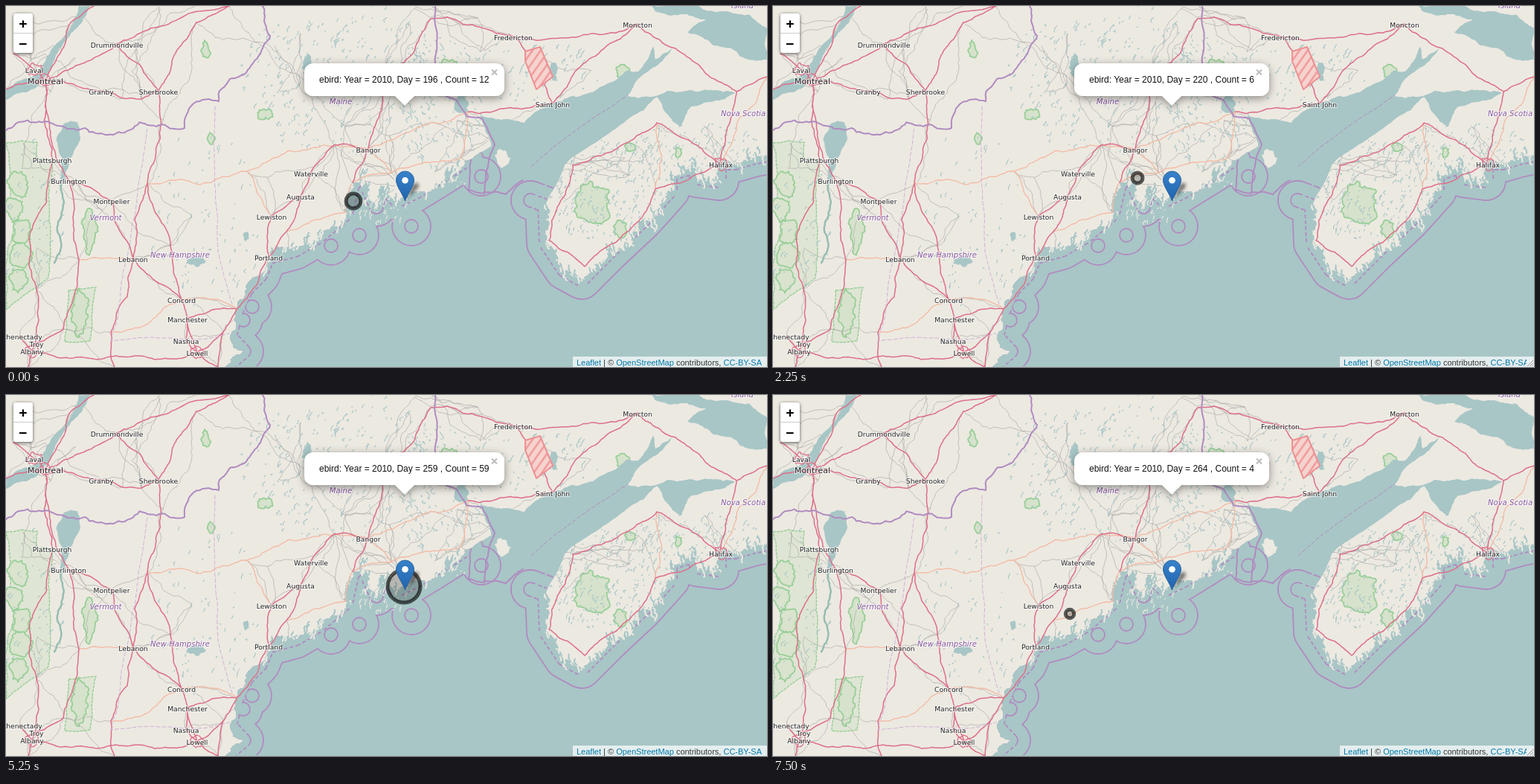
Write an HTML page that moves like this. It is 1023x485 px and loops after 8 s.

```html
<!DOCTYPE html>
<html lang="en">
<head>
<meta charset="utf-8">
<title>Sightings map</title>
<style>
  html, body { margin: 0; width: 100%; height: 100%; overflow: hidden; background: #ece9e1; }
  svg { display: block; width: 1023px; height: 485px; }
  path { stroke-linejoin: round; }
  .line { fill: none; stroke-linecap: round; }
  .town { font: 9.2px "DejaVu Sans", sans-serif; fill: #222; }
  .region { font: italic 10.1px "DejaVu Sans", sans-serif; fill: #85559c; }
  .halo { text-anchor: middle; paint-order: stroke; stroke: #fff; stroke-opacity: .65; stroke-width: 2px; }
  .ui { font: 12px "Liberation Sans", Arial, sans-serif; }
  .zoom { font: bold 18px "DejaVu Sans Mono", monospace; text-anchor: middle; }
  .credit { font: 11px "Liberation Sans", Arial, sans-serif; fill: #333; }
  .credit .link { fill: #0078a8; }
</style>
</head>
<body>
<svg id="stage" viewBox="0 0 1023 485">
  <defs>
    <linearGradient id="pin" x2="0" y2="1">
      <stop stop-color="#3883cb"/><stop offset="1" stop-color="#2062ad"/>
    </linearGradient>
    <pattern id="hatch" width="9" height="9" patternUnits="userSpaceOnUse" patternTransform="rotate(35)">
      <path d="M2 0V9" stroke="#f0999a" stroke-width="2.5"/>
    </pattern>
    <clipPath id="atSea"><path id="seaClip"/></clipPath>
    <filter id="soft" x="-60%" y="-60%" width="220%" height="220%"><feGaussianBlur stdDeviation="2.2"/></filter>
    <filter id="lift" x="-20%" y="-60%" width="140%" height="240%">
      <feDropShadow dx="0" dy="3" stdDeviation="6" flood-opacity=".42"/>
    </filter>
    <filter id="edge" x="-50%" y="-50%" width="200%" height="200%">
      <feDropShadow dx="0" dy="1" stdDeviation="2" flood-opacity=".65"/>
    </filter>
  </defs>
  <rect width="1023" height="485" fill="#ece9e1"/>
  <g id="map"></g>
  <circle id="spot" stroke-width="5"/>
  <path d="M537 261L547 240Q557 234 554 244Z" fill="#222" opacity=".6" filter="url(#soft)"/>
  <path d="M536.5 262C533 252 524.5 242 524.5 234A12 12 0 0 1 548.5 234C548.5 242 540 252 536.5 262Z"
        fill="url(#pin)" stroke="#2a659f"/>
  <circle cx="536.5" cy="234.3" r="4.3" fill="#fff"/>
  <g filter="url(#lift)">
    <rect id="bubble" y="77" height="44" rx="12" fill="#fff"/>
    <path d="M522.5 120.5H549.5L536 133.5Z" fill="#fff"/>
  </g>
  <text id="note" class="ui" y="103" fill="#111"></text>
  <path id="close" d="M-3.5 -3.5L3.5 3.5M3.5 -3.5L-3.5 3.5" stroke="#bcbcbc" stroke-width="2"/>
  <rect x="10" y="10" width="26" height="53" rx="4" fill="#fff" filter="url(#edge)"/>
  <path d="M10 36.5H36" stroke="#ccc"/>
  <text class="zoom" x="23" y="30">+</text>
  <text class="zoom" x="23" y="57">−</text>
  <rect x="762" y="471" width="261" height="14" fill="#fff" opacity=".7"/>
  <text class="credit" x="767" y="482.5"><tspan class="link">Leaflet</tspan> | © <tspan class="link">OpenStreetMap</tspan> contributors, <tspan class="link">CC-BY-SA</tspan></text>
  <g id="grip">
    <rect x="1013" y="475" width="10" height="10" fill="#eef1f1"/>
    <path d="M1014 484L1022 476M1017.5 484L1022 479.5M1020.5 484L1022 482.5" stroke="#8a8f8f"/>
  </g>
</svg>
<script>
const $ = id => document.getElementById(id);
const WATER = '#a8c6c6', LAND = '#ece9e1', PURPLE = '#b08bc0', GREEN = '#98cf98';
const map = $('map');
let seed = 7;
const rnd = () => (seed = (seed * 16807) % 2147483647) / 2147483647;
const spread = amount => (rnd() - .5) * amount;
const parse = text => text.split(' ').map(p => p.split(',').map(Number));
const toPath = points => 'M' + points.map(p => p.map(n => n.toFixed(1))).join('L');
const draw = markup => map.insertAdjacentHTML('beforeend', markup);
const fill = (d, color, more = '') => draw(`<path d="${d}" fill="${color}" ${more}/>`);
const stroke = (d, color, width, more = '') =>
  draw(`<path d="${d}" class="line" stroke="${color}" stroke-width="${width}" ${more}/>`);

// Fractal midpoint displacement between successive points.
function rough(points, amount, finest = 5) {
  const split = (a, b) => {
    const dx = b[0] - a[0], dy = b[1] - a[1];
    if (Math.hypot(dx, dy) < finest) return [b];
    const k = spread(amount);
    const mid = [(a[0] + b[0]) / 2 - dy * k, (a[1] + b[1]) / 2 + dx * k];
    return [...split(a, mid), ...split(mid, b)];
  };
  return points.slice(1).reduce((out, p, i) => out.concat(split(points[i], p)), [points[0]]);
}
const ring = (points, amount) => toPath(rough([...points, points[0]], amount, 4)) + 'Z';
function blob(cx, cy, rx, ry) {
  const corners = Array.from({ length: 11 }, (_, i) => {
    const a = i / 11 * 2 * Math.PI, k = .65 + rnd() * .45;
    return [cx + Math.cos(a) * rx * k, cy + Math.sin(a) * ry * k];
  });
  return ring(corners, .6);
}
// Small streaks scattered in an ellipse.
function specks(count, cx, cy, rx, ry, slope, size, color = WATER) {
  let d = '';
  for (let i = 0; i < count; i++) {
    const a = rnd() * 6.283, r = Math.sqrt(rnd()), l = size * (.2 + rnd() ** 3 * 1.8);
    const x = cx + Math.cos(a) * r * rx, y = cy + Math.sin(a) * r * ry;
    d += toPath([[x, y], [x + spread(3) + l * slope, y + l * .5], [x + l * slope + spread(2), y + l]]);
  }
  stroke(d, color, 1.1);
}
// Inlets and headlands along a coast.
function fringe(points, dx, dy) {
  const cuts = sign => points.filter(() => rnd() < .35).map(([x, y]) => {
    const k = sign * rnd() ** 2;
    return toPath(rough([[x, y], [x + dx * k + spread(3), y + dy * k]], .5, 3));
  }).join('');
  stroke(cuts(1), WATER, 2);
  stroke(cuts(-.9), LAND, 2);
}

const towns = {
  Drummondville: [149, 51], Laval: [38, 85], Montréal: [53, 100], Granby: [128, 114], Sherbrooke: [205, 114],
  Plattsburgh: [62, 206], Burlington: [84, 234], Montpelier: [142, 261], Lebanon: [171, 339], Concord: [236, 394],
  Manchester: [244, 420], Nashua: [242, 449], Lowell: [257, 465], Schenectady: [19, 443], Troy: [41, 453],
  Albany: [35, 463], Lewiston: [357, 282], Portland: [353, 337], Augusta: [396, 255], Waterville: [410, 224],
  Bangor: [487, 192], Fredericton: [682, 41], Moncton: [849, 24], 'Saint John': [735, 131], Halifax: [961, 212]
};
const junctions = {
  Berthier: [85, 25], Thetford: [256, 22], Jerome: [10, 64], Magog: [182, 125], Johnsbury: [190, 239],
  Rutland: [98, 341], Bennington: [77, 434], Brattleboro: [141, 438], Greenfield: [141, 471], Glens: [41, 380],
  Schroon: [31, 313], Plymouth: [221, 322], Amesbury: [292, 438], Kittery: [310, 407], Brunswick: [377, 303],
  Rumford: [324, 222], Newport: [441, 187], Rockland: [457, 277], Belfast: [466, 237], Ellsworth: [518, 224],
  Machias: [612, 204], Calais: [622, 142], Lincoln: [508, 105], Houlton: [571, 17], Woodstock: [593, 15],
  Sussex: [783, 72], Amherst: [900, 57], Truro: [982, 115], Kentville: [875, 157], Digby: [762, 214],
  Yarmouth: [730, 315], Barrington: [778, 350], Liverpool: [855, 284], Bridgewater: [873, 246],
  north: [300, 0], west: [0, 112], south: [30, 485], bay: [285, 485], valley: [146, 485], top: [118, 0], east: [1023, 95]
};
const place = { ...towns, ...junctions };
const routes = (text, amount, color, width) => stroke(text.split(', ').map(route =>
  toPath(rough(route.split('-').map(name => place[name]), amount, 6))).join(''), color, width);

// Parks
const park = `stroke="${GREEN}" stroke-width="1.4" stroke-dasharray="4 1"`;
const grove = `stroke="${GREEN}" stroke-width="1.8"`;
fill(ring(parse('0,184 42,183 41,205 63,208 60,300 57,365 25,388 0,408'), .12), '#dfe5d4', park);
fill(ring(parse('84,382 121,378 113,450 79,451'), .08), '#dfe5d4', park);
for (let y = 240; y < 390; y += 32) fill(blob(16 + spread(14), y, 14, 18), '#d9e3cd', grove);
for (const [x, y, rx, ry] of [[113, 305, 9, 33], [100, 415, 13, 36], [788, 262, 28, 32], [826, 300, 9, 13],
  [268, 59, 6, 13], [275, 178, 6, 9], [348, 145, 13, 8], [594, 79, 14, 8], [828, 87, 10, 11], [840, 190, 8, 7], [904, 197, 5, 9]])
  fill(blob(x, y, rx, ry), '#d6e2cb', grove);

// Minor roads join nearby places and run under the sea colour.
const hubs = Object.values(place);
for (let i = 0; i < 75; i++) hubs.push([rnd() * 1023, rnd() * (i % 3 ? 240 : 470)]);
const links = [];
hubs.forEach((a, i) => hubs.slice(i + 1).forEach(b => {
  const far = Math.hypot(a[0] - b[0], a[1] - b[1]);
  if (far > 25 && far < 100 && rnd() < .3) links.push(toPath(rough([a, b], .3, 7)));
}));
stroke(links.join(''), '#a9a8a5', .8, 'opacity=".8"');

// Lakes
specks(260, 450, 95, 135, 105, -.5, 5);
specks(180, 580, 125, 65, 90, .5, 5);
specks(80, 270, 290, 75, 130, -.3, 4);
specks(260, 820, 250, 90, 75, -.35, 4);
specks(120, 930, 190, 85, 35, -.5, 4);
specks(70, 710, 85, 90, 50, -.5, 5);
specks(70, 30, 280, 50, 110, -.6, 4);
for (const [x, y, rx, ry] of [[255, 343, 13, 9], [406, 82, 7, 16], [498, 102, 6, 18], [612, 133, 10, 14], [323, 309, 5, 7], [736, 88, 5, 16]])
  fill(blob(x, y, rx, ry), WATER);

// Sea, one coast after another from west to east
const maineKeys = parse('295,485 320,464 301,444 310,409 323,381 342,362 352,338 389,328 420,310 457,279 466,240 484,222 486,244 498,270 506,241 526,262 551,250 593,224 616,209');
const bayKeys = parse('616,209 652,189 650,177 638,147 666,153 697,157 733,131 781,118 834,87 850,88 870,55 873,72 895,57 879,76 845,104 834,122 850,124 890,114 914,114 980,117 966,125 921,135 908,162 888,144 875,122 847,145');
const westKeys = parse('847,145 760,204 705,262 751,214 724,268');
const southKeys = parse('724,268 726,319 750,355 774,368 811,331 857,288 893,248 893,226 925,216 928,231 959,235 959,211 980,211 1004,204 1023,200');
const maine = rough(maineKeys, .5, 4), south = rough(southKeys, .5, 4);
const sea = toPath([...maine, ...rough(bayKeys, .2, 4), ...rough(westKeys, .08), ...south, [1023, 485]]) + 'Z';
fill(sea, WATER);
$('seaClip').setAttribute('d', sea);

// Maritime limits: the outline of everything within a distance of the shore.
const islets = parse('319,422 331,404 437,322 475,308 545,296 639,229 705,261');
function limit(distance, more) {
  const shore = toPath(maineKeys) + toPath([[705, 261], ...southKeys]);
  for (const [color, grow] of [[PURPLE, 1], [WATER, -1]]) {
    const dash = color === PURPLE ? more : '';
    stroke(shore, color, 2 * (distance + grow * .9), `clip-path="url(#atSea)" ${dash}`);
    stroke(islets.map(([x, y]) => `M${x} ${y}h.01`).join(''), color, 2 * (distance + grow * .9), 'clip-path="url(#atSea)"');
  }
}
limit(26, '');
limit(9, 'stroke-dasharray="5 3" style="stroke-linecap:butt"');
stroke(sea, WATER, 2, 'clip-path="url(#atSea)"');
fringe(maine.filter(p => p[0] > 345), 5, -18);
fringe(south, -5, -16);
specks(50, 505, 270, 45, 20, -.3, 4, LAND);
specks(40, 575, 235, 45, 10, -.3, 3, LAND);
fill(blob(667, 204, 11, 15), LAND);
fill(blob(530, 247, 10, 13), LAND);
fill(ring(parse('868,0 872,6 941,18 916,36 951,53 975,57 987,68 1023,72 1023,30 1000,12 950,7 930,0'), .2), WATER);

// River and lake to the west
fill(ring(parse('98,0 113,0 84,42 54,94 0,126 0,113 40,93 64,55'), .2), WATER);
fill(ring(parse('78,158 96,156 84,208 74,246 70,190'), .3), WATER);
stroke(toPath(rough(parse('74,240 70,290 65,345'), .25)), '#94bcb0', 2.4);

routes('Johnsbury-Rumford-Newport, Newport-Bangor, Rumford-Lewiston, Rutland-Lebanon, Brattleboro-Concord-Kittery, ' +
  'Brunswick-Rockland-Belfast-Ellsworth-Machias-Calais, Bangor-Calais, Bangor-Ellsworth, Bridgewater-Kentville, Halifax-east',
  .2, '#f4b9a2', 1.3);
routes('west-Montréal-Berthier-top, Jerome-Laval-Montréal-Drummondville-north, Montréal-Granby-Magog-Sherbrooke-Thetford-north, ' +
  'Drummondville-Sherbrooke, Montréal-Plattsburgh-Schroon-Glens-Albany-south, Montréal-Burlington-Montpelier-Lebanon-Concord, ' +
  'Sherbrooke-Johnsbury-Lebanon-Brattleboro-Greenfield-valley, Johnsbury-Plymouth-Concord-Manchester-Lowell-bay, ' +
  'Burlington-Rutland-Bennington-Troy, Schenectady-Albany-Greenfield-Lowell, Manchester-Nashua-Lowell-Amesbury, ' +
  'bay-Amesbury-Kittery-Portland-Lewiston-Augusta-Waterville-Newport-Bangor-Lincoln-Houlton-Woodstock, ' +
  'Manchester-Kittery, Portland-Brunswick-Augusta, Bangor-Belfast, Woodstock-Fredericton-Moncton-Amherst-Truro-Halifax, ' +
  'Calais-Saint John-Sussex-Moncton, Fredericton-Saint John, Truro-east, Halifax-Kentville-Digby-Yarmouth-Barrington, ' +
  'Halifax-Bridgewater-Liverpool-Barrington', .16, '#dd6f89', 1.5);
// Ring roads around the larger cities
for (const name of ['Montréal', 'Laval', 'Lowell', 'Albany', 'Halifax'])
  stroke(blob(...place[name], 11, 9), '#dd6f89', 1.3);

// State and national borders
const border = (text, amount, color, width, more = '') =>
  stroke(toPath(rough(parse(text), amount)), color, width, more);
const dash = 'stroke-dasharray="5 3"';
border('281,135 285,330 304,400', .04, '#cfb0d6', 1, dash);
border('190,165 163,336 141,450 255,448 300,440', .08, '#cfb0d6', 1, dash);
border('706,216 770,164 836,120', .05, PURPLE, 1, dash);
border('0,167 240,164 252,131 286,128 301,98 320,92 355,40 345,0', .3, PURPLE, 2);
border('577,0 578,116 605,126 619,148 640,151 657,186 645,225 643,252 622,247 625,207', .1, PURPLE, 2);
border('643,250 672,253 695,234', .15, PURPLE, 2);

const burnt = toPath(parse('698,61 718,55 735,95 713,112 698,74')) + 'Z';
fill(burnt, '#f5d3cf');
fill(burnt, 'url(#hatch)', 'stroke="#ee8f92" stroke-width="2"');

const label = (name, x, y, cls, size = '') =>
  draw(`<text class="halo ${cls}" x="${x}" y="${y}" style="${size}">${name}</text>`);
for (const [name, [x, y]] of Object.entries(towns))
  label(name, x, y + 5, 'town', name === 'Montréal' ? 'font-size:10.9px' : '');
label('Maine', 450, 132, 'region');
label('Vermont', 134, 288, 'region');
label('New Hampshire', 234, 338, 'region');
label('Nova Scotia', 991, 148, 'region');
label('Island', 990, 3, 'region');

// Known sightings by step; the steps between them lie halfway.
const STEP = 750, LOOP = 8000;
const sightings = {
  0: { x: 467, y: 262, day: 196, count: 12 },
  2: { x: 376, y: 326, day: 206, count: 12, grip: true },
  3: { x: 490, y: 231, day: 220, count: 6, grip: true },
  5: { x: 490, y: 199, day: 250, count: 5 },
  6: { x: 534, y: 251, day: 254, count: 449, own: true, grip: true },
  8: { x: 536, y: 262, day: 264, count: 59 },
  10: { x: 399, y: 294, day: 264, count: 4, grip: true }
};
function sightingAt(step) {
  if (sightings[step]) return sightings[step];
  const a = sightings[step - 1], b = sightings[step + 1];
  const half = key => Math.round((a[key] + b[key]) / 2);
  return { x: half('x'), y: half('y'), day: half('day'), count: b.count };
}
const setAll = (el, attrs) => Object.entries(attrs).forEach(([k, v]) => el.setAttribute(k, v));

function show({ x, y, day, count, own, grip }) {
  const color = own ? '#f5101f' : '#000';
  setAll($('spot'), {
    cx: x, cy: y, r: 2.86 * Math.sqrt(count), fill: color, stroke: color,
    'fill-opacity': own ? .28 : .22, 'stroke-opacity': .62
  });
  $('note').textContent = `${own ? '' : 'ebird: '}Year = 2010, Day = ${day} , Count = ${count}`;
  const width = Math.floor($('note').getComputedTextLength()) + 41;
  const left = Math.round(535.5 - width / 2);
  setAll($('bubble'), { x: left, width });
  $('note').setAttribute('x', left + 20);
  $('close').setAttribute('transform', `translate(${left + width - 13.5} 89)`);
  $('grip').setAttribute('visibility', grip ? 'visible' : 'hidden');
}

let current = -1;
const start = performance.now();
function tick() {
  const step = Math.floor(((performance.now() - start) % LOOP) / STEP);
  if (step !== current) show(sightingAt(current = step));
  requestAnimationFrame(tick);
}
tick();
</script>
</body>
</html>
```
